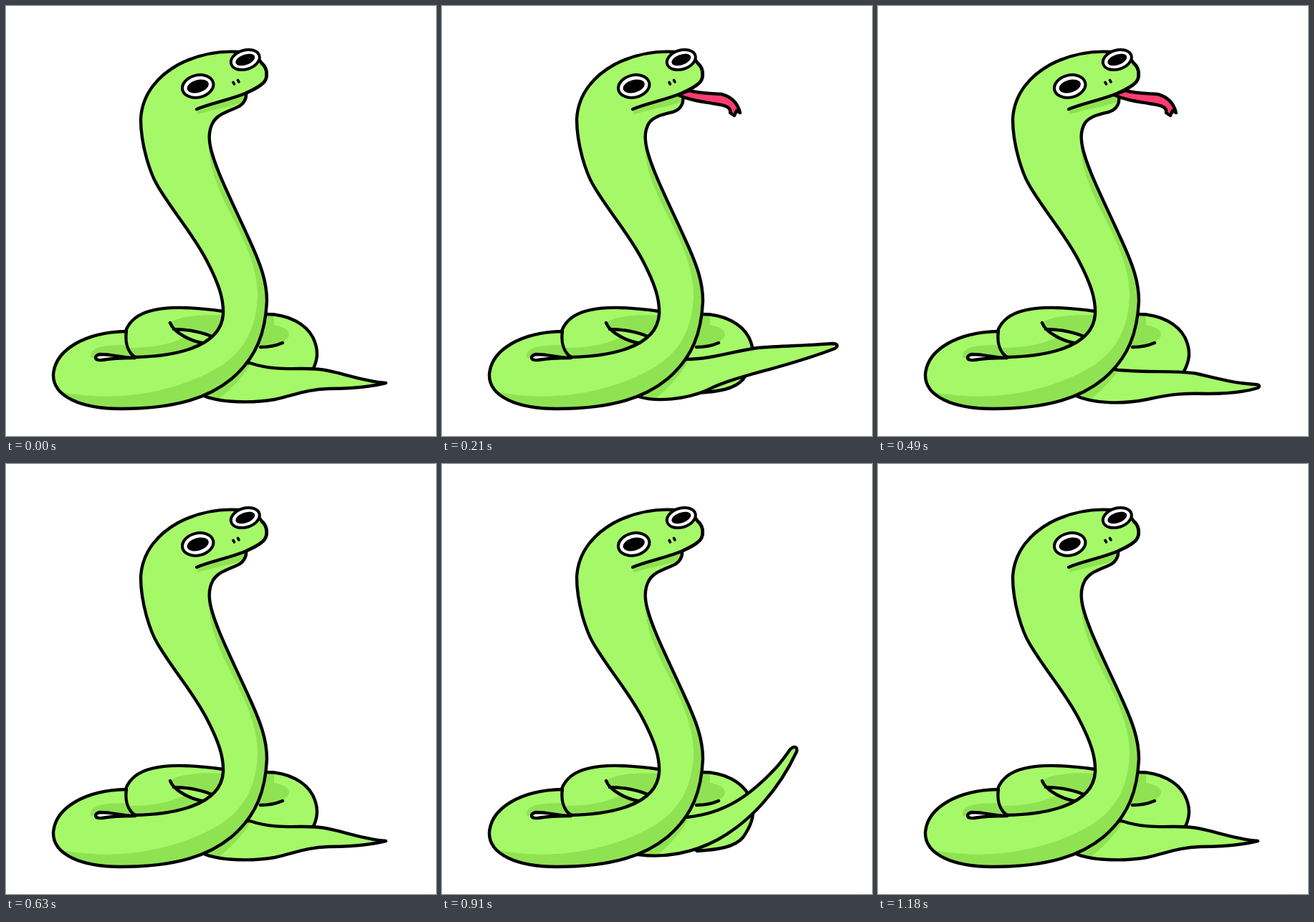
Write an HTML page that moves like this. It is 600 px wide and 600 px high and loops after 1250 ms.

```html
<!DOCTYPE html>
<html lang="en">
<head>
<meta charset="utf-8">
<title>Snake</title>
<style>
  html, body { margin: 0; width: 100%; height: 100%; overflow: hidden; background: #fff; }
  svg { display: block; width: 100%; height: 100%; }
  .line { fill: none; stroke: #000; stroke-width: 4.4; stroke-linecap: round; stroke-linejoin: round; }
  .skin { fill: #a5f968; }
  .shade { fill: #8fe352; }
  .eye { fill: #fff; stroke: #000; stroke-width: 4; }
</style>
</head>
<body>
<svg viewBox="0 0 600 600">
  <defs>
    <path id="body"/>
    <path id="tail"/>
    <clipPath id="bodyClip"><use href="#body"/></clipPath>
    <clipPath id="tailClip"><use href="#tail"/></clipPath>
    <path id="coil" d="M180 490 C160 478 164 455 172 444 C190 418 240 417 303 426 L363 430
      C395 430 418 444 428 462 C437 480 437 497 420 521 C408 535 385 538 356 540 L300 500Z"/>
  </defs>

  <!-- back coil -->
  <use href="#coil" class="skin"/>
  <g class="shade">
    <path d="M230 441 C246 431 280 430 306 432 L300 452 L287 461 Q262 451 234 451Z"/>
    <path d="M170 477 C200 477 225 474 250 462 Q262 469 280 471 L250 490 L180 490Z"/>
    <path d="M355 430 L374 433 L374 445 Q396 449 395 460 Q391 467 384 470 Q372 476 350 476Z"/>
  </g>
  <use href="#coil" class="line"/>
  <path class="line" d="M229 442 C232 450 238 455 247 460 Q262 469 280 471 M234 451 Q262 451 287 461 M386 470 Q372 476 355 476"/>

  <!-- tail -->
  <use href="#tail" class="skin"/>
  <path class="shade" clip-path="url(#tailClip)" d="M265 560 L295 550 Q325 527 343 497 L300 480Z"/>
  <use href="#tail" class="line"/>

  <!-- front body -->
  <use href="#body" class="skin"/>
  <g clip-path="url(#bodyClip)" class="shade">
    <path d="M283 190 C282 225 298 260 315 293 C340 340 351 372 351 405 C349 450 333 480 300 502
      C245 536 160 556 74 538 L70 580 L320 570 L380 420 L340 300Z"/>
    <path d="M118 491 C117 477 130 473 170 473 L184 491Z"/>
    <path d="M266 146 L336 122 L340 132 C318 140 300 142 268 151Z"/>
  </g>
  <use href="#body" class="line"/>
  <path class="line" style="fill:#fff" d="M180 491 C160 491 150 486 131 486 C122 488 123 495 134 494 C150 491 165 491 180 491Z"/>

  <!-- head -->
  <path id="tongue" class="line" style="fill:#ff3d70"/>
  <path class="line" d="M266 144 C285 136 312 131 335 121.500 C342 118 350 115 357 109 C366 103 366 88 357 80"/>
  <g transform="translate(267.700 112) rotate(-13)">
    <ellipse class="eye" rx="22" ry="15.500"/><ellipse rx="15.500" ry="8.800" transform="rotate(-3)"/>
  </g>
  <g transform="translate(333.800 75) rotate(-17)">
    <ellipse class="eye" rx="20.500" ry="13.300"/><ellipse rx="14" ry="7.200" transform="rotate(-3)"/>
  </g>
  <path class="line" style="stroke-width:3.600" d="M317 106.500 l1.500 2.500 M323.500 103.500 l1.500 2.500"/>
</svg>

<script>
const setPath = (id, d) => document.getElementById(id).setAttribute('d', d);

const jaws = {
  shut: 'C336 130 331 138 321 142 C305 149 295 152 289 162 C284 171 283 179 284 188',
  open: 'C339 134 334 144 322 148 C306 152 296 154 289 163 C284 171 283 179 284 188'
};

const bodyPath = jaw => `M303 430 C304 408 296 386 281 357 C262 319 231 285 210.500 249
  C204 238 200 226 196 212 C190 190 188 175 188 158 C190 120 215 96 240 82
  C265 69 295 62 325 64 C345 66 352 72 357 80 C366 88 366 103 357 109
  C350 115 342 118 335 121.500 ${jaw}
  C286 217 318 278 339 325 C356 362 364 385 364 412 C362 455 350 490 315 520
  C285 545 240 562 160 562 C105 562 66 545 66 515 C68 480 110 455 168 454
  C166 468 169 482 180 490 C230 489 300 478 303 430Z`;

const tails = {
  rest: 'M274 543 C295 553 340 555 375 549 C405 542 420 535 450 534 C480 534 510 531 530 526 C495 523 480 515 450 509 C420 501 385 513 340 498',
  lift: 'M274 543 C295 553 330 556 370 546 C395 538 410 526 440 528 C470 532 500 534 524 529 C500 523 475 504 445 496 C410 490 385 502 340 496',
  hump: 'M276 545 C290 554 320 555 343 547 C370 538 385 521 418 520 C445 518 465 533 511 527 C497 522 486 507 472 497 C455 484 430 477 405 481 C385 485 370 494 340 495',
  rise: 'M274 545 C300 553 340 549 370 536 C410 515 470 508 548 478 C554 474 551 471 545 471 C510 474 470 474 440 477 C405 482 375 493 340 493',
  high: 'M274 545 C310 550 350 543 385 524 C430 499 470 455 495 401 C496 394 491 393 486 398 C478 409 472 418 464 426 C430 462 395 488 340 493',
  drop: 'M274 544 C300 553 345 553 380 543 C440 530 495 510 533 462 C535 455 529 453 524 458 C500 483 460 494 425 498 C395 503 370 502 340 499',
  low: 'M274 543 C300 555 340 556 375 549 C410 541 430 540 460 541 C485 541 510 539 530 533 C534 530 531 528 526 528 C495 526 470 519 445 513 C415 508 385 512 335 508'
};

const tongues = {
  none: '',
  short: 'M345 118 C355 121 363 122 372 122 L369 127 L374 132 C358 134 345 131 329 124Z',
  up: 'M345 118 C365 123 385 125 400 123 C408 121 412 118 417 116 L416 122 L424 122 C417 132 405 138 390 138 C370 137 350 131 329 124Z',
  down: 'M345 118 C360 122 375 122 390 123 C405 127 413 137 416 149 L411 146 L408 153 L402 149 C404 140 392 138 378 136 C360 133 345 131 329 124Z'
};

const LOOP = 1250, STEP = 70, LATE = 1040;
const swing = ['rest', 'lift', 'hump', 'rise', 'high', 'high', 'drop', 'low', 'rest'];
const tailSteps = [...swing, ...swing.filter((_, i) => i !== 5)];
const tongueSteps = ['none', 'short', 'up', 'down', 'up', 'down', 'up', 'down', 'short'];

// The second raised pose is held longer, until LATE.
function stepAt(t) {
  return t < LATE ? Math.min(13, Math.floor(t / STEP)) : 14 + Math.floor((t - LATE) / STEP);
}

function draw(time) {
  const step = Math.min(16, stepAt(time % LOOP));
  const tongue = tongueSteps[step] || 'none';
  setPath('tail', tails[tailSteps[step]] + ' L300 500Z');
  setPath('tongue', tongues[tongue]);
  setPath('body', bodyPath(tongue === 'none' ? jaws.shut : jaws.open));
}

let start = null;
function tick(now) {
  if (start === null) start = now;
  draw(now - start);
  requestAnimationFrame(tick);
}
draw(0);
requestAnimationFrame(tick);
</script>
</body>
</html>
```
